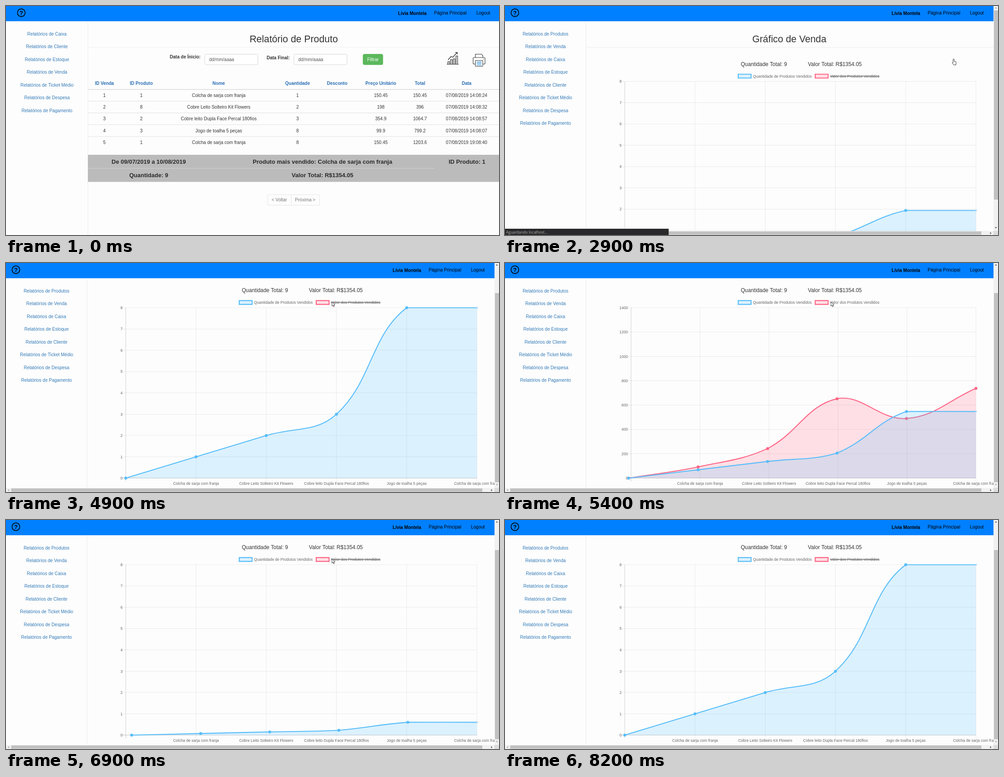
Write an HTML page with a canvas that moves like this. It is 1095 px wide and 511 px high and loops after 8.9 s.

```html
<!DOCTYPE html>
<html lang="pt">
<head>
<meta charset="utf-8">
<style>
html, body { margin: 0; width: 100%; height: 100%; overflow: hidden; background: #fdfdfd; }
canvas { display: block; }
</style>
</head>
<body>
<canvas id="stage" width="1095" height="511"></canvas>
<script>
const g = document.getElementById('stage').getContext('2d');
const LOOP = 8900, BLUE = '#56bdfa', RED = '#ff6384', LINK = '#337ab7';
const SANS = '"Liberation Sans", Arial, sans-serif';
const CHART_OPEN = 2860, SHOW_VALUES = 5080, HIDE_VALUES = 6883;

const lerp = (a, b, p) => a + (b - a) * p;
const clamp = (v, lo, hi) => Math.min(hi, Math.max(lo, v));
const smooth = p => p * p * (3 - 2 * p);
const outQuart = p => 1 - (1 - clamp(p, 0, 1)) ** 4;

// y is the middle of the capital letters
function text(str, x, y, { size = 10, color = '#333', align = 'center', bold = false, font = SANS } = {}) {
  g.font = `${bold ? 'bold ' : ''}${size}px ${font}`;
  g.fillStyle = color;
  g.textAlign = align;
  g.fillText(str, x, y + size * .36);
}
function rect(x, y, w, h, color) {
  g.fillStyle = color;
  g.fillRect(x, y, w, h);
}
function box(x, y, w, h, fill, stroke, radius = 3, width = .8) {
  g.beginPath();
  g.roundRect(x, y, w, h, radius);
  g.fillStyle = fill;
  g.fill();
  g.strokeStyle = stroke;
  g.lineWidth = width;
  g.stroke();
}
function path(d, stroke, width, fill, x = 0, y = 0) {
  const p = new Path2D(d);
  g.save();
  g.translate(x, y);
  if (fill) { g.fillStyle = fill; g.fill(p); }
  g.strokeStyle = stroke;
  g.lineWidth = width;
  g.stroke(p);
  g.restore();
}
function dot(x, y, r, color) {
  g.beginPath();
  g.arc(x, y, r, 0, 7);
  g.fillStyle = color;
  g.fill();
}

function header(dx, width) {
  rect(0, 0, width, 34, '#0080ff');
  g.beginPath();
  g.arc(34 + dx, 15, 8.6, 0, 7);
  g.strokeStyle = '#000';
  g.lineWidth = 1.6;
  g.stroke();
  text('?', 34 + dx, 15, { size: 13, bold: true, color: '#000' });
  text('Lívia Montela', 902.5 + dx, 16, { bold: true, color: '#000' });
  text('Página Principal', 987 + dx, 15, { color: '#000' });
  text('Logout', 1060 + dx, 15, { color: '#000' });
}
function sidebar(items, x, border) {
  rect(border, 34, .8, 477, '#e8e8e8');
  items.forEach((item, i) => text('Relatórios de ' + item, x, 62 + 28.55 * i, { color: LINK }));
}

const columns = [218.5, 300.5, 472.5, 647.5, 735.5, 832.5, 919.5, 1023];
const heads = ['ID Venda', 'ID Produto', 'Nome', 'Quantidade', 'Desconto', 'Preço Unitário', 'Total', 'Data'];
const products = ['', 'Colcha de sarja com franja', 'Cobre Leito Solteiro Kit Flowers',
  'Cobre leito Dupla Face Percal 180fios', 'Jogo de toalha 5 peças', 'Colcha de sarja com franja'];
const sales = [
  [1, 1, products[1], 1, '', 150.45, 150.45, '07/08/2019 14:08:24'],
  [2, 8, products[2], 2, '', 198, 396, '07/08/2019 14:08:32'],
  [3, 2, products[3], 3, '', 354.9, 1064.7, '07/08/2019 14:08:57'],
  [4, 3, products[4], 8, '', 99.9, 799.2, '07/08/2019 14:08:07'],
  [5, 1, products[5], 8, '', 150.45, 1203.6, '07/08/2019 19:08:40']
];
const quantities = [0, ...sales.map(row => row[3])];
const values = [0, ...sales.map(row => row[6])];

function chartIcon() {
  path('M979 130H1005.500M981.500 130V124H985V130M987.500 130V119.500H991V130M993.500 130V118H997V130M999.500 130V111.500H1003V130'
    + 'M982 120L988.500 112.500 992.500 114.500 1002 103.500M997.500 103.500H1002.300V108', '#222', 1.2);
}
function printerIcon() {
  path('M1042.500 115V107.500H1056L1059 110.500V115', '#333', 1.1, '#fff');
  box(1037.5, 115, 26.5, 14.5, '#fff', '#333', 2, 1.1);
  box(1042.5, 121.5, 16.5, 13, '#fff', '#333', 1, 1.1);
  path('M1045.500 125H1056M1045.500 128H1056M1045.500 131.500H1056', '#3d9be0', 1.3);
  dot(1060.5, 118.5, .8, '#333');
}

function reportPage() {
  header(0, 1095);
  sidebar(['Caixa', 'Cliente', 'Estoque', 'Venda', 'Ticket Médio', 'Despesa', 'Pagamento'], 91, 181.5);
  text('Relatório de Produto', 639, 73, { size: 21.4 });
  rect(182, 91.5, 913, .8, '#eaeaea');
  text('Data de Ínicio:', 398, 113.5, { bold: true });
  text('Data Final:', 604.5, 115, { bold: true });
  for (const x of [441.5, 639.5]) {
    box(x, 107.5, 118, 23.5, '#fff', '#ccc');
    text('dd/mm/aaaa', x + 9.5, 119, { align: 'left', color: '#555' });
  }
  box(793, 107.5, 44, 23.5, '#5cb85c', '#4cae4c');
  text('Filtrar', 815, 119, { color: '#fff' });
  chartIcon();
  printerIcon();

  heads.forEach((head, i) => text(head, columns[i], 172.5, { bold: true, color: '#2a6fb5' }));
  sales.forEach((row, r) => {
    const y = 199 + 26.3 * r;
    rect(182, y - 13.4, 913, r ? .8 : 1.5, '#d9d9d9');
    row.forEach((cell, i) => text(cell, columns[i], y));
  });

  rect(182, 332, 913, 60.5, '#bbb');
  rect(182, 361.8, 770, .9, '#d6d6d6');
  const strong = { size: 13, bold: true, color: '#2b2b2b' };
  text('De 09/07/2019 a 10/08/2019', 317, 347.5, strong);
  text('Produto mais vendido: ' + products[1], 703, 347.5, strong);
  text('ID Produto: 1', 1024, 347.5, strong);
  text('Quantidade: 9', 317, 377.5, strong);
  text('Valor Total: R$1354.05', 703, 377.5, strong);

  box(581, 421, 115.5, 23.5, '#fdfdfd', '#ddd');
  rect(633, 421, .8, 23.5, '#ddd');
  text('< Voltar', 607, 432.5, { color: '#777' });
  text('Próxima >', 664.5, 432.5, { color: '#777' });
}

const TOP = 168.2, BOTTOM = 548.4, RIGHT = 1046;
const plotX = (i, left) => left + (RIGHT - left) * i / 5;

// Each entry: point, incoming control, outgoing control
function spline(data, max, left) {
  const pts = data.map((v, i) => [plotX(i, left), lerp(BOTTOM, TOP, v / max)]);
  return pts.map((p, i) => {
    const a = pts[i - 1] || p, b = pts[i + 1] || p;
    const before = Math.hypot(p[0] - a[0], p[1] - a[1]);
    const after = Math.hypot(b[0] - p[0], b[1] - p[1]);
    const control = k => [
      clamp(p[0] + k * (b[0] - a[0]), left, RIGHT),
      clamp(p[1] + k * (b[1] - a[1]), TOP, BOTTOM)
    ];
    const k = .4 / (before + after);
    return [...p, ...control(-k * before), ...control(k * after)];
  });
}
const blend = (from, to, p) => from.map((pt, i) => pt.map((v, j) => lerp(v, to[i][j], p)));

const NARROW = 266, WIDE = 280;
const flat = spline(quantities.map(() => 0), 8, NARROW);
const countCurve = spline(quantities, 8, NARROW);
const lowCurve = spline(quantities, 1400, WIDE);
const valueCurve = spline(values, 1400, WIDE);

function curve(pts, color, fill) {
  const trace = () => pts.forEach((p, i) => {
    const q = pts[i - 1];
    if (q) g.bezierCurveTo(q[4], q[5], p[2], p[3], p[0], p[1]);
    else g.moveTo(p[0], p[1]);
  });
  g.save();
  g.beginPath();
  g.rect(200, TOP - 1.2, RIGHT - 200 + .6, BOTTOM - TOP + 2.4);
  g.clip();
  g.beginPath();
  trace();
  g.lineTo(pts[5][0], BOTTOM);
  g.lineTo(pts[0][0], BOTTOM);
  g.fillStyle = fill;
  g.fill();
  g.beginPath();
  trace();
  g.strokeStyle = color;
  g.lineWidth = 2.14;
  g.stroke();
  g.restore();
  pts.slice(0, 5).forEach(p => dot(p[0], p[1], 3.2, color));
}

function legend(x, label, color, fill, hidden) {
  box(x, 152.3, 28.6, 8.5, fill, color, 0, 2.14);
  text(label, x + 33, 156.5, { size: 8.56, align: 'left', color: '#666' });
  if (hidden) rect(x + 33, 155.9, g.measureText(label).width, 1.3, '#666');
}

function chart(t) {
  const showValues = t >= SHOW_VALUES && t < HIDE_VALUES;
  const left = showValues ? WIDE : NARROW;
  const max = showValues ? 1400 : 8, step = showValues ? 200 : 1;
  const blueFill = 'rgba(86,190,255,.2)', redFill = 'rgba(255,99,132,.2)';
  const small = { size: 8.56, color: '#666' };

  legend(518, 'Quantidade de Produtos Vendidos', BLUE, blueFill, false);
  legend(689, 'Valor dos Produtos Vendidos', RED, redFill, !showValues);
  for (let v = 0; v <= max; v += step) {
    const y = lerp(BOTTOM, TOP, v / max);
    rect(left - 7, y - .4, RIGHT - left + 7, .75, v ? 'rgba(0,0,0,.1)' : 'rgba(0,0,0,.3)');
    text(v, left - 7, y, { ...small, align: 'right' });
  }
  products.forEach((name, i) => {
    const x = plotX(i, left);
    rect(x - .4, TOP, .75, BOTTOM - TOP + 7, i ? 'rgba(0,0,0,.1)' : 'rgba(0,0,0,.25)');
    text(name, x, BOTTOM + 11.6, small);
  });

  let blue;
  if (t < SHOW_VALUES) blue = blend(flat, countCurve, outQuart((t - 2834) / 1000));
  else if (showValues) {
    const p = outQuart((t - 5190) / 1000), red = blend(flat, valueCurve, p);
    curve(red, RED, redFill);
    dot(red[5][0], red[5][1], 3.2, RED);
    dot(red[5][0], red[5][1], 1.6, '#f0718b');
    blue = blend(countCurve, lowCurve, p);
  } else blue = blend(lowCurve, countCurve, outQuart((t - HIDE_VALUES) / 1000));
  curve(blue, BLUE, blueFill);
  dot(blue[5][0], blue[5][1], 2.4, 'rgba(170,215,245,.8)');
}

function scrollbars(scroll) {
  rect(1085, 0, 10, 511, '#f1f1f1');
  rect(0, 502, 1085, 9, '#f1f1f1');
  rect(1085, 502, 10, 9, '#dcdcdc');
  rect(1086, 10 + scroll * .835, 9, 422, '#c1c1c1');
  rect(11.5, 503, 1046.5, 7.5, '#c1c1c1');
  const arrow = (d, color) => path(d, 'transparent', 1, color);
  arrow('M1087.800 5.500H1092.800L1090.300 2.800Z', scroll ? '#505050' : '#a3a3a3');
  arrow('M1087.800 493.500H1092.800L1090.300 496.200Z', scroll > 68 ? '#a3a3a3' : '#505050');
  arrow('M6.800 504.500V509.500L4 507Z', '#a3a3a3');
  arrow('M1077.500 504.500V509.500L1080.300 507Z', '#505050');
}

function chartPage(t) {
  const scroll = 68.4 * smooth(clamp((t - 3600) / 250, 0, 1));
  g.save();
  g.translate(0, -scroll);
  text('Gráfico de Venda', 631.5, 73, { size: 21.3 });
  rect(180, 91.8, 905, .8, '#e6e6e6');
  text('Quantidade Total: 9', 575, 129.5, { size: 11.85 });
  text('Valor Total: R$1354.05', 732.5, 129.5, { size: 11.85 });
  chart(t);
  g.restore();
  sidebar(['Produtos', 'Venda', 'Caixa', 'Estoque', 'Cliente', 'Ticket Médio', 'Despesa', 'Pagamento'], 90, 179.5);
  header(-12, 1085);
  scrollbars(scroll);
}

function statusBar(t) {
  if (t < 1600 || t >= 3050) return;
  rect(0, 497, 363.5, 14, '#29292b');
  const message = t < 2700
    ? 'localhost:8080/sistema/grafico/venda?inicio=2019-07-09&fim=2019-08-10'
    : 'Aguardando localhost...';
  text(message, 2.5, 504.5, { size: 8.4, align: 'left', color: '#b5b5b5', font: '"Open Sans", sans-serif' });
}

// time, x, y of the pointer tip
const moves = [
  [290, 700, 418], [1100, 988, 132], [1300, 990, 122], [1500, 990, 122], [1800, 994, 120],
  [2100, 994, 120], [2300, 996.5, 118.5], [3000, 996.5, 118.5], [3700, 923.5, 162], [4250, 667, 109],
  [4900, 724, 86.5], [7750, 724, 86.5], [8150, 900, 530]
];
function pointer(t) {
  const i = moves.findIndex(m => m[0] > t);
  if (i < 1) return;
  const [t0, x0, y0] = moves[i - 1], [t1, x1, y1] = moves[i];
  const p = (t - t0) / (t1 - t0), x = lerp(x0, x1, p), y = lerp(y0, y1, p);
  if (t > 1050 && t < 3100)
    path('M-1.300 8V.8a1.200 1.200 0 0 1 2.400 0V4.600L4.600 5.500Q5.700 6 5.500 7.500L4.800 13H.3L-3.300 8.600Q-2.600 7-1.300 8Z', '#222', .9, '#fff', x, y);
  else path('M0 0V9.800L2.200 7.700 3.800 11.200 5.200 10.600 3.700 7.200H6.800Z', '#333', .9, '#fff', x, y);
}

function draw(now) {
  const t = now % LOOP;
  rect(0, 0, 1095, 511, '#fdfdfd');
  if (t < CHART_OPEN) reportPage();
  else chartPage(t);
  statusBar(t);
  pointer(t);
}

const start = performance.now();
function tick() {
  draw(performance.now() - start);
  requestAnimationFrame(tick);
}
tick();
</script>
</body>
</html>
```
